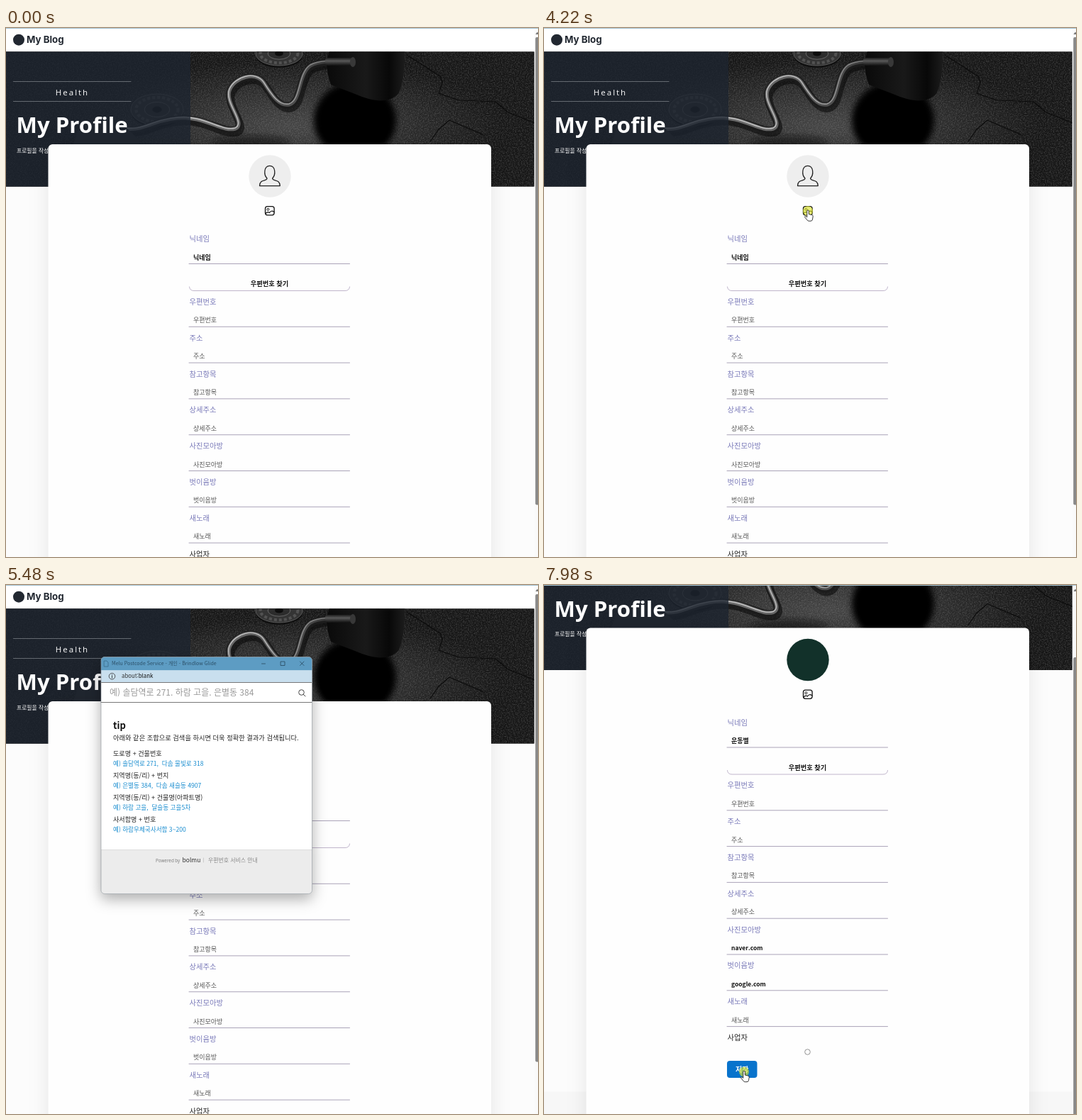
An HTML page that plays this animation: 750 by 746 pixels, repeating every 8000 ms.

```html
<!DOCTYPE html>
<html lang="ko">
<head>
<meta charset="utf-8">
<title>My Profile</title>
<style>
  html, body { margin: 0; width: 100%; height: 100%; overflow: hidden; background: #fcfcfc; }
  svg { display: block; width: 100vw; height: 100vh; }
  text { font-family: "Noto Sans CJK KR", "Noto Sans CJK", "Noto Sans", sans-serif; white-space: pre; }
  .latin { font-family: "Open Sans", "Noto Sans", sans-serif; }
  .brand { font-family: Inter, sans-serif; }
  .card { filter: drop-shadow(0 2px 14px rgba(0, 0, 0, .09)); }
  .window { filter: drop-shadow(0 7px 10px rgba(0, 0, 0, .32)); }
  .line { fill: none; stroke-linecap: round; stroke-linejoin: round; }
</style>
</head>
<body>
<svg id="stage" viewBox="0 0 750 746" preserveAspectRatio="none"></svg>
<script>
const LOOP = 8000;
const SCROLL = 103.5;
const DIALOG_AT = 4840, DIALOG_OPEN = 4940, POPUP_AT = 5480, POPUP_END = 6620, SCROLL_AT = 6770;

const text = (x, y, size, content, attrs = '') =>
  `<text x="${x}" y="${y}" font-size="${size}" ${attrs}>${content}</text>`;
const rect = (x, y, w, h, fill, attrs = '') =>
  `<rect x="${x}" y="${y}" width="${w}" height="${h}" fill="${fill}" ${attrs}/>`;
const circle = (x, y, r, fill, attrs = '') =>
  `<circle cx="${x}" cy="${y}" r="${r}" fill="${fill}" ${attrs}/>`;
const ellipse = (x, y, rx, ry, fill, attrs = '') =>
  `<ellipse cx="${x}" cy="${y}" rx="${rx}" ry="${ry}" fill="${fill}" ${attrs}/>`;
const line = (d, stroke, width = 1, attrs = '') =>
  `<path class="line" d="${d}" stroke="${stroke}" stroke-width="${width}" ${attrs}/>`;
const shape = (d, fill, attrs = '') => `<path d="${d}" fill="${fill}" ${attrs}/>`;
const group = (id, content, attrs = '') => `<g id="${id}" ${attrs}>${content}</g>`;

const plate = (x, y, rx, ry) =>
  ellipse(x, y + 3, rx, ry, '#101010') +
  ellipse(x, y, rx, ry, '#343434', 'stroke="#5c5c5c"') +
  ellipse(x, y, rx * .8, ry * .78, 'none', 'stroke="#777" stroke-width="4" stroke-dasharray="4 3" opacity=".45"') +
  ellipse(x, y, rx * .48, ry * .48, '#2c2c2c', 'stroke="#666"') +
  ellipse(x, y, rx * .18, ry * .2, '#0c0c0c');

function hero() {
  const bar = 'M160 142C180 146 192 142 205 137S245 124 270 130S310 147 324 143C340 136 308 107 316 88' +
    'C324 70 352 62 364 78C376 97 386 112 400 109C417 104 412 66 430 54C443 47 465 48 490 48';
  const weight = 'M456 33H562Q563 72 553 93Q535 112 492 93L458 80Q448 52 456 33Z';
  return `<g clip-path="url(#heroClip)">` +
    rect(0, 33, 745, 191, '#161616') +
    rect(0, 33, 745, 191, 'url(#floor)') +
    rect(0, 33, 745, 191, '#fff', 'filter="url(#grain)"') +
    line('M565 38L612 68L615 77L610 92L638 102L690 104L708 119L745 134M598 160L610 143L625 130L646 139L672 150', '#0b0b0b', 1.2) +
    ellipse(492, 130, 58, 54, '#050505', 'filter="url(#soft)"') +
    ellipse(345, 162, 55, 10, '#080808', 'opacity=".5" filter="url(#soft)"') +
    plate(385, 36, 33, 17) + plate(213, 115, 37, 22) +
    line(bar, '#060606', 11, 'transform="translate(2 4)" opacity=".55"') +
    line(bar, '#1c1c1c', 9.5) +
    line(bar, 'url(#chrome)', 5, 'transform="translate(-.5 -1)"') +
    line(bar, 'url(#shine)', 1.5, 'transform="translate(-1 -2)"') +
    shape(weight, 'url(#iron)') +
    rect(450, 42, 42, 11, 'url(#steel)', 'rx="4"') + ellipse(489, 48, 4, 7, '#383838') +
    shape('M105 132L160 132L188 158V164H95Z', '#2b2b2b') +
    rect(0, 33, 260, 191, '#1d2530', 'opacity=".8"') + '</g>' +
    line('M10.5 75.5H176M10.5 103.5H176', '#777c82', .8) +
    text(93.5, 94.5, 11.5, 'Health', 'class="latin" fill="#fff" letter-spacing="2" text-anchor="middle"') +
    text(14.5, 148.3, 31.2, 'My Profile', 'class="latin" fill="#fff" font-weight="700"') +
    text(15, 175.5, 7.8, '프로필을 작성해주세요', 'fill="#fff"');
}

function field(y, label) {
  return text(258.5, y + 3.6, 10.3, label, 'fill="#7878b8"') +
    line(`M258 ${y + 35}H484.5`, '#aaa3b8');
}

const placeholder = (y, label) => text(264, y + 29, 9, label, 'fill="#555"');
const entry = (y, value, size = 9) => text(264, y + 29, size, value, 'fill="#111" font-weight="700"');

function form() {
  const labels = ['우편번호', '주소', '참고항목', '상세주소', '사진모아방', '벗이음방', '새노래'];
  const rowY = i => 386.3 + i * 50.8;
  const social = i => i === 4 || i === 5;
  return field(297.5, '닉네임') +
    line('M258.5 365Q259 370.5 265 370.5H478Q484 370.5 484.5 365', '#b9adc6', .9) +
    text(371.5, 364, 9.2, '우편번호 찾기', 'fill="#111" font-weight="700" text-anchor="middle"') +
    labels.map((label, i) => field(rowY(i), label) + (social(i) ? '' : placeholder(rowY(i), label))).join('') +
    group('blank', entry(297.5, '닉네임') + placeholder(rowY(4), labels[4]) + placeholder(rowY(5), labels[5])) +
    group('filled', entry(297.5, '운동별') + entry(rowY(4), 'naver.com', 8.5) + entry(rowY(5), 'google.com', 8.5)) +
    text(258.5, 745.5, 10.3, '사업자', 'fill="#222"') +
    circle(371.5, 762, 3.8, '#fff', 'stroke="#777" stroke-width=".8"') +
    rect(258, 774.5, 42.5, 24, '#0873cc', 'rx="4"') +
    text(279.2, 790.5, 10, '저장', 'fill="#fff" font-weight="700" text-anchor="middle"');
}

function page() {
  const person = 'M368 212C363 207 363.5 194.3 371.8 194.3S380.5 207 375.6 212C375.6 216.5 386.3 212.5 386.3 222.6H357.5C357.5 212.5 368 216.5 368 212';
  return rect(0, 0, 750, 33.5, '#fff') +
    rect(0, 818, 750, 60, '#f7f7f7') +
    circle(18, 16.7, 8, '#222831') +
    text(29, 21, 13.3, 'My Blog', 'class="brand" font-weight="700" fill="#222831"') +
    hero() +
    rect(59.5, 164, 624.5, 760, '#fefefe', 'rx="6" class="card"') +
    group('emptyAvatar', circle(372, 209, 29.7, '#eee') + line(person, '#222', 1.3)) +
    group('avatar', circle(372, 209, 29.7, '#12312a')) +
    rect(365.5, 251.6, 12.6, 12.2, 'none', 'rx="3" stroke="#111" stroke-width="1.3"') +
    circle(369.4, 255.8, 1.5, 'none', 'stroke="#111"') +
    line('M366 261.5Q369 258.5 371.5 260.5Q374 256.5 378 259.5', '#111', 1.2) +
    form();
}

function photoThumb(x, dx) {
  return rect(x, 29, 46, 46, '#74685f') +
    rect(x, 29, 15, 46, '#47413d') + rect(x + 36, 29, 10, 30, '#3a3532') +
    shape(`M${x} 75L${x + 10} 58H${x + 38}L${x + 46} 75Z`, '#aaa29b') +
    circle(x + dx, 51, 15, '#e9e9ee') + circle(x + dx, 51, 5, '#fff', 'stroke="#c4c4cc"');
}

function fileDialog() {
  const chevron = (x, y) => line(`M${x - 2.2} ${y - 1}L${x} ${y + 1.2}L${x + 2.2} ${y - 1}`, '#555', .9);
  const arrow = x => shape(`M${x - 2.5} 12.5H${x + 2.5}L${x} 15.3Z`, '#333');
  const caption = (x, y, s) => text(x, y, 7.4, s, 'text-anchor="middle" fill="#222"');
  const items =
    text(12, 16, 7.7, '구성', 'fill="#222"') + arrow(31) + text(52, 16, 7.7, '새 폴더', 'fill="#222"') +
    rect(376.5, 10.5, 6.5, 5, 'none', 'stroke="#333"') + line('M377 17.5H383', '#333') + arrow(393) +
    rect(408.5, 10.5, 8, 7, '#fff', 'stroke="#222"') + rect(413, 10, 4, 8, '#1976b8') +
    circle(434, 13.5, 5, '#0878cf') + text(434, 16.3, 7.5, '?', 'fill="#fff" text-anchor="middle"') +
    shape('M109.5 37Q109.5 34.5 112 34.5H123L127 38.5H150Q153 38.5 153 41V66H109.5Z', '#e9aa2e') +
    rect(109.5, 42, 43.5, 27, '#fbd263', 'rx="2"') + rect(122, 46, 18, 10, '#fff3cf') + shape('M126 54L129 49H137L134 54Z', '#3975a6') +
    caption(131, 84, 'TimberBasketI') + caption(131, 93, 'nstallTool') +
    photoThumb(165, 22) + caption(188.5, 84, '1.jpg') +
    photoThumb(222, 20) + caption(245.5, 84, '2.jpg') +
    rect(279, 48, 46, 27, '#4b4541') + rect(279, 48, 46, 8, '#777a7d') + rect(279, 66, 46, 9, '#28292c') +
    rect(284, 57, 10, 8, '#96765d') + rect(307, 55, 13, 11, '#786456') + line('M292 66L301 62L312 66', '#c99d70') +
    caption(303, 84, '123.png') +
    text(78, 205.3, 7.8, '파일 이름(N):', 'fill="#222"') + line('M126.7 198V207', '#111', .9) +
    chevron(313, 203) + text(329, 205.3, 7.2, '이미지 파일 (*.xbm;*.tif;*.jfif;*.i', 'fill="#222" clip-path="url(#typeClip)"') + chevron(432, 203) +
    text(352, 223.3, 7.6, '열기(O)', 'fill="#111" text-anchor="middle"') +
    text(412, 223.3, 7.6, '취소', 'fill="#111" text-anchor="middle"') +
    line('M444 232L446 230M441 233L446 228', '#999', .7);
  return shape('M0 -8H448V229Q448 235 442 235H6Q0 235 0 229Z', '#f0f0f0') +
    rect(0, -8, 448, 30.5, '#f5f8fa') + rect(0, 22.5, 448, 166.5, '#fff') +
    rect(84, 22.5, 9, 166.5, '#f1f1f1') + rect(88, 56, 1.3, 54, '#888') +
    rect(438.5, 22.5, 9.5, 157, '#f4f4f4') + rect(442.3, 33, 1.3, 28, '#888') +
    rect(124, 195.8, 195, 14, '#fff', 'rx="1.5" stroke="#1679bd"') +
    rect(326, 195.8, 112, 14, '#fff', 'rx="1.5" stroke="#d0d0d0"') +
    rect(326.5, 213.7, 51, 14, '#fdfdfd', 'rx="2" stroke="#1679bd"') +
    rect(386.5, 213.7, 51, 14, '#fdfdfd', 'rx="2" stroke="#d0d0d0" stroke-width=".8"') +
    group('dialogItems', items);
}

function postcodePopup() {
  const tips = [
    ['도로명 + 건물번호', '예) 솔담역로 271,  다솜 물빛로 318'],
    ['지역명(동/리) + 번지', '예) 은별동 384,  다솜 새슬동 4907'],
    ['지역명(동/리) + 건물명(아파트명)', '예) 하람 고을,  달슬동 고을5차'],
    ['사서함명 + 번호', '예) 하람우체국사서함 3~200'],
  ];
  return rect(134, 101.5, 297.5, 334, '#fff', 'rx="5"') +
    shape('M134 120.5V107Q134 101.5 139 101.5H426.5Q431.5 101.5 431.5 107V120.5Z', '#5d9cc3') +
    line('M138.5 107H142L144 109V115H138.5Z', '#396a89', .8) +
    text(149, 113.4, 7, 'Melu Postcode Service - 개인 - Brindlow Glide', 'fill="#2c5068"') +
    line('M360.5 111H365.5M387.5 108H393V113.5H387.5ZM414.5 108L420 113.5M420 108L414.5 113.5', '#28475c', .8) +
    rect(134, 120.5, 297.5, 17, '#c9dfee') +
    circle(149.5, 128.7, 4.3, 'none', 'stroke="#333" stroke-width=".8"') + line('M149.5 128V131M149.5 126.4V126.5', '#333', .9) +
    text(163, 131.3, 7.8, 'about:<tspan fill="#111" font-weight="500">blank</tspan>', 'fill="#333"') +
    line('M134 137.5H431M134 165.5H431', '#777') +
    text(146, 156.3, 12, '예) 솔담역로 271. 하람 고을. 은별동 384', 'fill="#999" font-weight="300"') +
    circle(416.5, 151.5, 3.8, 'none', 'stroke="#444"') + line('M419.4 154.4L422 157', '#444') +
    text(151, 203, 13, 'tip', 'font-weight="700" fill="#111"') +
    text(151, 219.3, 9.25, '아래와 같은 조합으로 검색을 하시면 더욱 정확한 결과가 검색됩니다.', 'fill="#222"') +
    tips.map(([title, sample], i) =>
      text(151, 241 + i * 30.9, 9.1, title, 'fill="#222"') +
      text(151, 254.8 + i * 30.9, 8.6, sample, 'fill="#188ccf"')).join('') +
    shape('M134 373.5H431.5V430.5Q431.5 435.5 426.5 435.5H139Q134 435.5 134 430.5Z', '#ececec') +
    line('M134 373.5H431', '#ddd') +
    text(211, 390.6, 6.3, 'Powered by', 'class="latin" fill="#777"') +
    text(248.5, 391, 8.5, 'bolmu', 'fill="#333" font-weight="500"') +
    line('M278.5 385V391', '#ccc') +
    text(285, 391, 7.9, '우편번호 서비스 안내', 'fill="#888"') +
    rect(134, 101.5, 297.5, 334, 'none', 'rx="5" stroke="#8a9299" stroke-width=".6"');
}

const defs = `<defs>
  <clipPath id="heroClip"><rect y="33.5" width="744.5" height="190"/></clipPath>
  <clipPath id="typeClip"><rect x="326" y="195" width="101" height="15"/></clipPath>
  <filter id="soft" x="-20%" y="-20%" width="140%" height="140%"><feGaussianBlur stdDeviation="4"/></filter>
  <filter id="grain" x="0" y="0" width="100%" height="100%"><feTurbulence type="fractalNoise" baseFrequency=".6" numOctaves="2" seed="4"/>
    <feColorMatrix values="0 0 0 0 .6  0 0 0 0 .6  0 0 0 0 .6  .5 0 0 0 -.2"/></filter>
  <radialGradient id="floor" gradientUnits="userSpaceOnUse" cx="0" cy="0" r="1" gradientTransform="translate(400 140) scale(300 95)">
    <stop stop-color="#454545"/><stop offset=".4" stop-color="#333"/><stop offset="1" stop-color="#161616"/></radialGradient>
  <linearGradient id="chrome" gradientUnits="userSpaceOnUse" x1="160" x2="490"><stop stop-color="#777"/><stop offset=".5" stop-color="#666"/>
    <stop offset=".8" stop-color="#484848"/><stop offset="1" stop-color="#222"/></linearGradient>
  <linearGradient id="shine" gradientUnits="userSpaceOnUse" x1="160" x2="490"><stop stop-color="#ccc"/><stop offset=".6" stop-color="#bbb"/>
    <stop offset="1" stop-color="#555"/></linearGradient>
  <linearGradient id="iron"><stop stop-color="#0a0a0a"/><stop offset=".5" stop-color="#191919"/>
    <stop offset=".8" stop-color="#080808"/><stop offset="1" stop-color="#1c1c1c"/></linearGradient>
  <linearGradient id="steel" x2="0" y2="1"><stop stop-color="#1c1c1c"/><stop offset=".4" stop-color="#585858"/><stop offset="1" stop-color="#111"/></linearGradient>
</defs>`;

const arrowCursor = shape('M0 0V10.6L2.5 8.3L4.1 12L5.9 11.2L4.3 7.6H7.4Z', '#fff', 'stroke="#222" stroke-width=".8"');
const handCursor = shape('M-1.2 1.2A1.3 1.3 0 0 1 1.4 1.2V5.6L5.8 6.6Q7.4 7 7.2 8.8L6.5 13Q6.2 15.2 4 15.2H1.2Q0 15.2 -.8 14L-4.6 9.4Q-4 7.8 -2.4 8.8L-1.2 9.8Z',
  '#fff', 'stroke="#222" stroke-width=".9"');

const stage = document.getElementById('stage');
stage.innerHTML = defs + rect(0, 0, 750, 746, '#fcfcfc') +
  group('page', page()) +
  rect(745, 0, 5, 746, '#fafafa') + shape('M746.5 9H750V6.5L749 5.5Z', '#777') +
  rect(746.3, 13, 6, 659.5, '#888', 'id="thumb" rx="2"') +
  rect(0, 0, 750, 1, '#a3c3d3') +
  group('dialog', fileDialog(), 'class="window"') +
  group('popup', postcodePopup(), 'class="window"') +
  group('cursor', circle(0, 1, 7, '#dce42c', 'id="click" opacity=".65"') +
    group('arrow', arrowCursor) + group('hand', handCursor));

const el = Object.fromEntries([...stage.querySelectorAll('[id]')].map(node => [node.id, node]));
const show = (node, on) => node.setAttribute('display', on ? 'inline' : 'none');

// start, end, from x, from y, to x, to y, options
const moves = [
  [20, 820, 706, 697, 380, 253],
  [920, 1640, 373, 258, 402, 308],
  [1740, 2470, 404, 310, 685, 734],
  [2570, 3370, 685, 733, 367, 242, { bend: -20 }],
  [3470, 4240, 368, 244, 372, 257, { hand: true, click: 4140 }],
  [4340, 4740, 400, 300, 653, 710],
  [5530, 6030, 662, 420, 415, 108],
  [6920, 7660, 664, 740, 316, 686, { bend: -48 }],
  [7760, 7960, 305, 686, 282, 685.5, { hand: true, click: 7960 }],
];

function drawCursor(t) {
  const move = moves.findLast(m => t >= m[0]);
  const visible = move && !(t >= 5240 && t < 5530) && !(t >= POPUP_END && t < 6920);
  show(el.cursor, visible);
  if (!visible) return;
  const [start, end, x0, y0, x1, y1, { hand = false, click = Infinity, bend = 0 } = {}] = move;
  const held = Math.floor((t - start) / 100) * 100;   // the pointer is sampled ten times a second
  const p = 1 - (1 - Math.min(1, held / (end - start))) ** 3.45;
  const x = x0 + (x1 - x0) * p;
  const y = y0 + (y1 - y0) * p + bend * Math.sin(Math.PI * p);
  el.cursor.setAttribute('transform', `translate(${x} ${y})`);
  show(el.hand, hand);
  show(el.arrow, !hand);
  show(el.click, t >= click);
}

function draw(t) {
  const scrolled = t >= SCROLL_AT;
  const opening = t < DIALOG_OPEN;
  el.page.setAttribute('transform', `translate(0 ${scrolled ? -SCROLL : 0})`);
  el.thumb.setAttribute('y', scrolled ? 102 : 13);
  show(el.filled, scrolled);
  show(el.blank, !scrolled);
  show(el.avatar, t >= POPUP_AT);
  show(el.emptyAvatar, t < POPUP_AT);
  show(el.dialog, t >= DIALOG_AT && t < POPUP_AT);
  show(el.dialogItems, !opening);
  el.dialog.setAttribute('opacity', opening ? .34 : 1);
  el.dialog.setAttribute('transform', opening ? 'translate(20.5 8) scale(.893)' : '');
  show(el.popup, t >= POPUP_AT && t < POPUP_END);
  drawCursor(t);
}

const began = performance.now();
function tick() {
  draw((performance.now() - began) % LOOP);
  requestAnimationFrame(tick);
}
tick();
</script>
</body>
</html>
```
